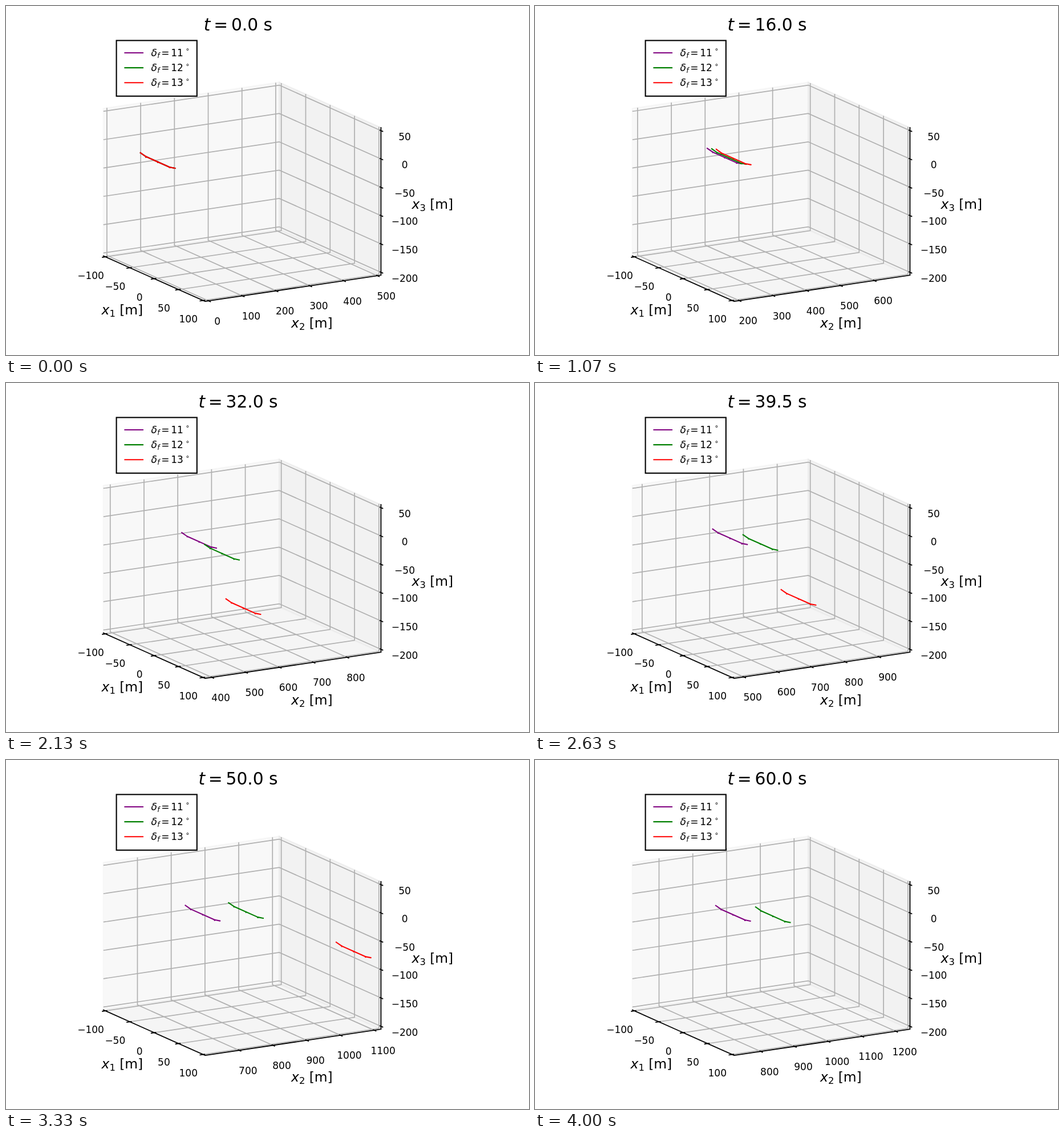
Animation of 917x611 px, one loop 4030 ms. Source, as an HTML page:

```html
<!DOCTYPE html>
<html lang="en">
<head>
<meta charset="utf-8">
<title>Flight paths</title>
<style>
  html, body { margin: 0; width: 100%; height: 100%; overflow: hidden; background: #fff; }
  svg { display: block; width: 917px; height: 611px; font-family: "DejaVu Sans", sans-serif; }
  path { fill: none; }
  .grid { stroke: #b0b0b0; stroke-width: 1.7; }
  .axis { stroke: #000; stroke-width: 1.8; stroke-linecap: square; }
  .plane { stroke-width: 2.1; stroke-linejoin: round; stroke-linecap: square; }
  .tick { font-size: 17px; text-anchor: middle; }
  .label { font-size: 23.4px; }
  .title { font-size: 29.7px; }
  .key { font-size: 17px; }
  .it { font-style: oblique; }
  .sub { font-size: 70%; }
</style>
</head>
<body>
<svg id="stage" viewBox="0 0 917 611">
  <defs><clipPath id="view"><rect width="684" height="611"/></clipPath></defs>
</svg>
<script>
const LOOP = 4030, SPEED = 12.192, SPAN = 500;
const stage = document.getElementById('stage');

function add(parent, tag, attrs, text) {
  const el = document.createElementNS('http://www.w3.org/2000/svg', tag);
  for (const k in attrs) el.setAttribute(k, attrs[k]);
  if (text !== undefined) el.textContent = text;
  parent.appendChild(el);
  return el;
}
const group = cls => add(stage, 'g', { class: cls });
const write = (parent, x, y, text, cls = '') => add(parent, 'text', { x, y, class: cls }, text);

// Orthographic projection; u is x2 measured from the start of the moving window
const project = ([x, u, z]) => [
  266.1 + 0.856 * x + 0.592 * u,
  272.9 + 0.382 * x - 0.088 * u - 0.992 * z
];
const trace = (...pts) => 'M' + pts.map(p => project(p).map(v => v.toFixed(2)).join(' ')).join('L');
const number = n => String(n).replace('-', '\u2212');

// Box limits with a margin of 1/48 on each side
const X0 = -104.17, X1 = 104.17, U0 = -10.42, U1 = 510.42, Z0 = -205.2, Z1 = 55.2;

// Panes
const panes = [
  [242, [X0, U0, Z0], [X0, U1, Z0], [X0, U1, Z1], [X0, U0, Z1]],
  [230, [X0, U1, Z0], [X1, U1, Z0], [X1, U1, Z1], [X0, U1, Z1]],
  [236, [X0, U0, Z0], [X0, U1, Z0], [X1, U1, Z0], [X1, U0, Z0]]
];
for (const [v, ...pts] of panes) {
  const color = `rgba(${v},${v},${v},.5)`;
  add(stage, 'path', { d: trace(...pts) + 'Z', style: `fill:${color};stroke:${color};stroke-width:2` });
}

// Fixed grid, ticks and numbers
const grid = group('grid'), axes = group('axis'), numbers = group('tick');
const line = (parent, ...pts) => add(parent, 'path', { d: trace(...pts) });

function place(el, p, dx, dy) {
  const [x, y] = project(p);
  el.setAttribute('x', (x + dx).toFixed(2));
  el.setAttribute('y', (y + dy + 6.2).toFixed(2));
}

for (let x = -100; x <= 100; x += 50) {
  line(grid, [x, U0, Z0], [x, U1, Z0], [x, U1, Z1]);
  line(axes, [x, U0 - 8.7, Z0], [x, U0 + 4.3, Z0]);
  place(write(numbers, 0, 0, number(x)), [x, U0, Z0], -25.8, 32.2);
}
for (let z = -200; z <= 50; z += 50) {
  line(grid, [X0, U0, z], [X0, U1, z], [X1, U1, z]);
  line(axes, [X1 - 1.7, U1, z], [X1 + 3.5, U1, z]);
  place(write(numbers, 0, 0, number(z)), [X1, U1, z], 41.6, 10.2);
}
line(axes, [X0, U0, Z0], [X1, U0, Z0], [X1, U1, Z0], [X1, U1, Z1]);

// Sliding x2 marks, reused as the window moves
const marks = Array.from({ length: 6 }, () => ({
  grid: add(grid, 'path', {}),
  tick: add(axes, 'path', {}),
  text: write(numbers, 0, 0, '')
}));

function slide(start) {
  const first = Math.ceil(start / 100 - 1e-6) * 100;
  marks.forEach((m, i) => {
    const value = first + i * 100, u = value - start, on = u <= SPAN + 1e-6;
    m.grid.setAttribute('d', on ? trace([X1, u, Z0], [X0, u, Z0], [X0, u, Z1]) : '');
    m.tick.setAttribute('d', on ? trace([X1 - 1.7, u, Z0], [X1 + 3.5, u, Z0]) : '');
    m.text.textContent = on ? value : '';
    place(m.text, [X1, u, Z0], 15.5, 35.3);
  });
}

// Axis names
const names = group('label');
[[167.5, 539.6], [500, 562.6], [711.5, 355]].forEach(([x, y], i) => {
  write(names, x, y, 'x', 'it');
  write(names, x + 13.9, y + 4, i + 1, 'sub');
  write(names, x + 31.7, y, '[m]');
});

// Each path joins a few points: seconds, window offset, height
const launch = [[0, 0, 0], [3, 2, -4]];
const planes = [
  { color: 'purple', path: [[10, 83, -34], [16, 112, -2], [25, 117, -19], [39.5, 128, -10], [60, 137, -10]] },
  { color: 'green', path: [[10, 91, -40], [16, 125, -4], [25, 164, -48], [39.5, 218, -28], [50, 261, -16], [60, 255, -23]] },
  { color: 'red', path: [[10, 97, -46], [16, 138, -6], [25, 204, -131], [39.5, 331, -135], [50, 580, -114], [60, 860, -60]] }
];
for (const p of planes) p.path.unshift(...launch);

// Smooth cubic through the points: [u, z] at time t
function locate(path, t) {
  const last = path.length - 1;
  let i = 0;
  while (i < last - 1 && t >= path[i + 1][0]) i++;
  const slope = (j, n) => {
    const a = path[Math.max(j - 1, 0)], b = path[Math.min(j + 1, last)];
    return j === 0 ? 0 : (b[n] - a[n]) / (b[0] - a[0]);
  };
  const h = path[i + 1][0] - path[i][0], s = (t - path[i][0]) / h;
  return [1, 2].map(n => {
    const a = path[i][n], d = path[i + 1][n] - a;
    const p = h * slope(i, n), q = h * slope(i + 1, n);
    return a + s * (p + s * (3 * d - 2 * p - q + s * (p + q - 2 * d)));
  });
}

// Flat centre wing, raised tips and three small pods, pitched along the path
function wing(path, t) {
  const [u, z] = locate(path, t), [u2, z2] = locate(path, t + 0.01);
  const pitch = Math.atan2(z2 - z, u2 - u + SPEED * 0.01);
  const at = (x, up) => [x, u - up * Math.sin(pitch), z + up * Math.cos(pitch)];
  const pods = [-24.4, 0, 24.4].map(x => trace(at(x, 0), at(x, -0.8)));
  return trace(at(-35.4, 2.4), at(-24.4, 0), at(24.4, 0), at(35.4, 2.4)) + pods.join('');
}

const fleet = add(stage, 'g', { class: 'plane', 'clip-path': 'url(#view)' });
for (const p of planes) p.el = add(fleet, 'path', { stroke: p.color });

// Legend
add(stage, 'rect', { x: 193.6, y: 60.4, width: 141.2, height: 97.4, fill: '#fff', stroke: '#000', 'stroke-width': 2.1 });
const key = group('key');
planes.forEach((p, i) => {
  const y = 88 + 26.1 * i;
  add(key, 'path', { d: `M207.4 ${y - 6}H241`, stroke: p.color, 'stroke-width': 2.1 });
  write(key, 254.5, y, '\u03b4', 'it');
  write(key, 265.2, y + 3.2, 'f', 'it sub');
  write(key, 272.3, y, '=');
  write(key, 289.2, y, 11 + i);
  write(key, 314.6, y - 7.6, '\u2218', 'sub');
});

// Title
const title = group('title');
write(title, 346.8, 43.4, 't', 'it');
write(title, 364.2, 43.4, '=');
const clock = write(title, 394.9, 43.4, '');

let shown = -1;
function draw(now) {
  // 30 steps a second, each starting on a whole hundredth
  const step = Math.ceil((Math.floor((now % LOOP) / 10) + 0.5) * 0.3) - 1;
  if (step === shown) return;
  shown = step;
  const t = step / 2;
  clock.textContent = t.toFixed(1) + ' s';
  title.setAttribute('transform', `translate(${t < 10 ? 0 : -9.4} 0)`);
  slide(t * SPEED);
  for (const p of planes) p.el.setAttribute('d', wing(p.path, t));
}

draw(0);
let begin;
requestAnimationFrame(function tick(now) {
  begin ??= now;
  draw(now - begin);
  requestAnimationFrame(tick);
});
</script>
</body>
</html>
```
